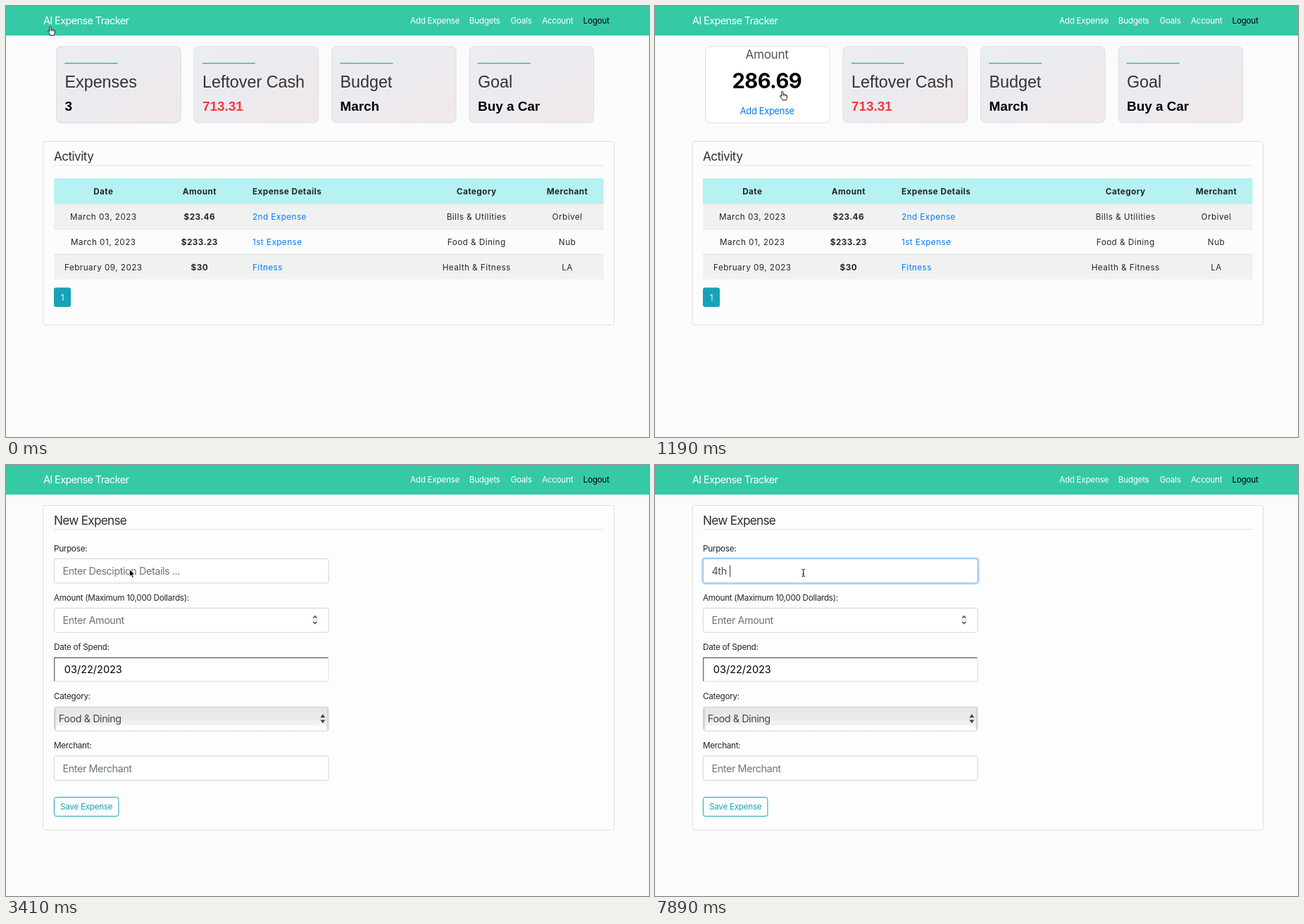
These frames come from a looping animation (913x613 px, 8000 ms). An HTML page:

```html
<!DOCTYPE html>
<html lang="en">
<head>
<meta charset="utf-8">
<title>Expense tracker</title>
<style>
html, body { margin: 0; width: 100%; height: 100%; overflow: hidden; background: #fbfbfb; }
#stage { position: relative; width: 913px; height: 613px; overflow: hidden; }
svg { position: absolute; left: 0; top: 0; overflow: visible; }
text { font-family: Inter, Roboto, sans-serif; white-space: pre; }
text.arial { font-family: "Liberation Sans", Arial, sans-serif; }
#scene { position: absolute; left: 71px; top: 57px; width: 177px; height: 109px; perspective: 960px; }
#flip { position: absolute; inset: 0; transform-style: preserve-3d; }
#flip svg { backface-visibility: hidden; }
#back { transform: rotateY(180deg); }
</style>
</head>
<body>
<div id="stage">
  <svg id="bar" width="913" height="613"></svg>
  <div id="home">
    <svg id="dash" width="913" height="613"></svg>
    <div id="scene"><div id="flip">
      <svg id="front" width="177" height="109" viewBox="71 57 177 109"></svg>
      <svg id="back" width="177" height="109" viewBox="71 57 177 109"></svg>
    </div></div>
  </div>
  <svg id="form" width="913" height="613"></svg>
  <svg id="pointer" width="913" height="613">
    <g id="hand" fill="#fff" stroke="#111" stroke-width="1" stroke-linejoin="round">
      <path d="M-2.3 1.4V-4.4Q-2.3-5.7-1.2-5.7T-.1-4.4V-1.4Q.8-2 1.7-1.1Q2.7-1.6 3.5-.6Q5.4-.9 5.4 1V3Q5.4 4.4 4.4 5.6V6.8H-1.2V5.8L-4.4 1.8Q-4.8 .5-3.6 .5Z"/>
      <path d="M-.1-1.4V1M1.8-1V1.2M3.6-.5V1.4" fill="none" stroke-width=".7"/>
    </g>
    <path id="arrow" d="M0 0V10.4L2.4 8.2L4 12L5.8 11.2L4.2 7.5H7.4Z" fill="#000" stroke="#fff" stroke-width=".8"/>
    <path id="beam" d="M-2.4-5.2Q0-5.2 0-3.8Q0-5.2 2.4-5.2M0-3.8V3.8M-2.4 5.2Q0 5.2 0 3.8Q0 5.2 2.4 5.2M-1.2 1.6H1.2" fill="none" stroke="#111" stroke-width="1"/>
  </svg>
</div>
<script>
const LOOP = 8000;
const $ = id => document.getElementById(id);
const INK = '#212529', LINK = '#007bff', TEAL = '#17a2b8';

const escape = s => s.replace(/&/g, '&amp;');

// ls is the letter spacing in em
function text(x, y, str, { size = 11.7, fill = INK, ls = -.023, weight = 400, anchor = 'start', attr = '' } = {}) {
  return `<text x="${x}" y="${y}" font-size="${size}" fill="${fill}" font-weight="${weight}"
    letter-spacing="${(ls * size).toFixed(3)}" text-anchor="${anchor}" ${attr}>${escape(str)}</text>`;
}
function rect(x, y, w, h, fill, stroke = 'none', r = 0, attr = '') {
  return `<rect x="${x}" y="${y}" width="${w}" height="${h}" rx="${r}" fill="${fill}" stroke="${stroke}" ${attr}/>`;
}
const path = (d, stroke, width = 1, fill = 'none') =>
  `<path d="${d}" stroke="${stroke}" stroke-width="${width}" fill="${fill}"/>`;
const heading = (y, str, ls) => text(68, y, str, { size: 17.2, ls, fill: '#2b2f33' });

function drawBar() {
  const links = [[574, 'Add Expense'], [657.8, 'Budgets'], [716.5, 'Goals'], [761, 'Account']];
  $('bar').innerHTML = rect(0, 0, 913, 42, '#36c9a6')
    + text(53, 25.7, 'AI Expense Tracker', { size: 14.4, ls: -.04, fill: '#fff' })
    + links.map(([x, s]) => text(x, 24.8, s, { fill: '#fff' })).join('')
    + text(819.6, 24.8, 'Logout', { fill: '#000' });
}

function card(x, title, value, color = '#000') {
  const plain = { ls: 0, attr: 'class="arial"' };
  return rect(x + .5, 57.5, 176.5, 108.5, 'url(#tint)', '#dcdee0', 7)
    + path(`M${x + 12.3} 81.6h75`, '#35b799', 1.5)
    + text(x + 12.5, 116, title, { ...plain, size: 23.3, fill: '#333' })
    + text(x + 12.5, 148.6, value, { ...plain, size: 18.9, weight: 700, fill: color });
}

function tableRow(i, [date, amount, details, category, merchant]) {
  const y = 304 + i * 35.8;
  const mid = { anchor: 'middle', ls: .04 };
  return text(138.3, y, date, mid)
    + text(274.8, y, amount, { ...mid, weight: 700 })
    + text(350, y, details, { ls: .04, fill: LINK })
    + text(668.2, y, category, mid)
    + text(797, y, merchant, mid);
}

function drawDash() {
  const rows = [
    ['March 03, 2023', '$23.46', '2nd Expense', 'Bills & Utilities', 'Orbivel'],
    ['March 01, 2023', '$233.23', '1st Expense', 'Food & Dining', 'Nub'],
    ['February 09, 2023', '$30', 'Fitness', 'Health & Fitness', 'LA']
  ];
  const head = { weight: 700, ls: .04, anchor: 'middle' };
  $('dash').innerHTML = `<defs><linearGradient id="tint" x1="0" y1="0" x2="1" y2="1">
      <stop offset="0" stop-color="#eaedf1"/><stop offset=".5" stop-color="#ecebef"/>
      <stop offset="1" stop-color="#f1e8ea"/></linearGradient></defs>`
    + rect(71.5, 57.5, 176.5, 108.5, '#fff', '#dcdee0', 7)
    + card(266.5, 'Leftover Cash', '713.31', '#f6383b')
    + card(462, 'Budget', 'March')
    + card(657.5, 'Goal', 'Buy a Car')
    + rect(53, 192.5, 810.5, 261, '#fcfcfc', '#dfdfdf', 3)
    + heading(220.2, 'Activity', -.034)
    + path('M68 226.8H848.5', '#e2e2e2')
    + rect(68, 245, 780.5, 36.5, '#b5f2f1')
    + rect(68, 281.5, 780.5, 36, '#f0f2f1') + rect(68, 353.2, 780.5, 35.8, '#f0f2f1')
    + path('M68 281.5H848.5M68 317.5H848.5M68 353.2H848.5', '#dee2e4')
    + [[138.3, 'Date'], [274.8, 'Amount'], [668.2, 'Category'], [797, 'Merchant']]
        .map(([x, s]) => text(x, 267.7, s, head)).join('')
    + text(350, 267.7, 'Expense Details', { ...head, anchor: 'start' })
    + rows.map((r, i) => tableRow(i, r)).join('')
    + rect(68, 400.5, 24, 27.5, TEAL, 'none', 3)
    + text(80, 418.6, '1', { fill: '#fff', anchor: 'middle' });
  $('front').innerHTML = card(71, 'Expenses', '3');
  $('back').innerHTML = text(159, 75, 'Amount', { size: 17.2, ls: -.02, anchor: 'middle', fill: '#555' })
    + text(158.8, 117, '286.69', { size: 29.2, ls: -.02, weight: 700, anchor: 'middle', fill: '#000' })
    + text(159.3, 154, 'Add Expense', { size: 12.9, anchor: 'middle', attr: 'id="add"' })
    + `<path id="underline" d="M121 156.3H198" stroke="#0056b3"/>`;
}

function drawForm() {
  const big = { size: 14.4, ls: -.03, fill: '#6c757d' };
  const labels = ['Purpose:', 'Amount (Maximum 10,000 Dollards):', 'Date of Spend:', 'Category:', 'Merchant:'];
  const box = y => rect(68.3, y, 390, 34.5, '#fff', '#ced4da', 3);
  $('form').innerHTML = `<defs><linearGradient id="grey" x1="0" y1="0" x2="0" y2="1">
      <stop offset="0" stop-color="#e5e5e5"/><stop offset=".3" stop-color="#e9e9e9"/><stop offset=".56" stop-color="#ebebeb"/>
      <stop offset=".58" stop-color="#f0f0f0"/><stop offset=".76" stop-color="#f2f2f2"/>
      <stop offset=".78" stop-color="#fdfdfd"/><stop offset="1" stop-color="#fff"/></linearGradient></defs>`
    + rect(53, 57.5, 810.5, 461.5, '#fdfdfd', '#dfdfdf', 3)
    + heading(84.8, 'New Expense', -.042)
    + path('M68 91.6H848.5', '#e2e2e2')
    + labels.map((s, i) => text(68, 122.7 + i * 70.1, s)).join('')
    + box(133.4) + box(203.6) + box(413.9)
    + rect(66.9, 132.1, 392.8, 37.1, 'none', '#bfdeff', 4, 'id="ring" stroke-width="2.2"')
    + rect(68.3, 133.4, 390, 34.5, 'none', '#80bdff', 3, 'id="edge"')
    + text(80.5, 156, 'Enter Desciption Details ...', { ...big, attr: 'id="hint"' })
    + text(80.5, 156, '', { ...big, fill: '#495057', attr: 'id="typed"' })
    + `<path id="caret" d="M0 142.5V159" stroke="#333"/>`
    + text(80.5, 226.2, 'Enter Amount', big)
    + rect(434, 212.5, 10, 16, '#f6f6f6', 'none', 5)
    + path('M434 220.5h10', '#e2e2e2', .8)
    + path('M436.2 217.6l2.6-2.6l2.6 2.6M436.2 222.9l2.6 2.6l2.6-2.6', '#444', 1.4)
    + rect(68.3, 273.8, 389.7, 34, '#fff', '#e0e0e0', 2)
    + path('M68.7 307.5V274.2H457.5', '#757575', 1.4)
    + text(82.8, 296.2, '03/22/2023', { size: 14.5, ls: 0, fill: '#000' })
    + rect(68.5, 344, 389.5, 34.3, 'url(#grey)', '#cfcfcf', 3)
    + path('M70 346V376M456.6 346V376', '#d5d5d5', 2)
    + text(74.8, 366.2, 'Food & Dining', { ...big, fill: '#444a50' })
    + path('M446.3 359.2l3.5-5l3.5 5zM446.3 362.4l3.5 5l3.5-5z', 'none', 0, '#40464c')
    + text(80.5, 436.6, 'Enter Merchant', big)
    + rect(68.4, 472.5, 91.5, 27, '#fff', TEAL, 3)
    + text(114.2, 490.4, 'Save Expense', { fill: TEAL, anchor: 'middle' });
}

// Each track is a list of [start time, ...values], held until the next entry.
const tracks = {
  cursor: [
    [0, 'hand', 64, 35], [150, 'arrow', 48, 58], [300, 'arrow', 27, 81],
    [590, 'arrow', 62, 92], [740, 'hand', 148, 116], [890, 'hand', 182, 127],
    [1790, 'hand', 195, 128], [1940, 'hand', 210, 130], [2080, 'hand', 219, 131],
    [2230, 'hand', 217, 138], [2380, 'hand', 206, 147], [2530, 'hand', 194, 154],
    [2670, 'hand', 183, 156], [2810, 'hand', 177, 154],
    [3260, 'arrow', 175.4, 148.4], [3860, 'beam', 210.7, 153.3]
  ],
  angle: [[0, 0], [740, 5], [890, 82], [1040, 155], [1190, 180]],
  hover: [[0, false], [2530, true]],
  form: [[0, false], [3410, true]],
  focus: [[0, 0], [4160, .6], [4310, 1]],
  caret: [[0, 0], [4160, 1], [4760, 0], [5210, 1], [5810, 0], [6260, 1], [6700, 0], [7000, 1]],
  typed: [[0, '', 80.8], [7000, '4', 89.8], [7450, '4t', 94.5], [7590, '4th', 102.6], [7890, '4th ', 106.6]]
};
const at = (name, t) => tracks[name].findLast(step => step[0] <= t).slice(1);
const show = (id, on) => { $(id).style.display = on ? '' : 'none'; };

function render(t) {
  const [shape, x, y] = at('cursor', t);
  for (const id of ['hand', 'arrow', 'beam']) show(id, id === shape);
  $(shape).setAttribute('transform', `translate(${x} ${y})`);

  const [onForm] = at('form', t);
  show('home', !onForm);
  show('form', onForm);

  $('flip').style.transform = `rotateY(${at('angle', t)[0]}deg)`;
  const [hover] = at('hover', t);
  $('add').setAttribute('fill', hover ? '#0056b3' : LINK);
  show('underline', hover);

  const [focus] = at('focus', t);
  $('ring').style.opacity = $('edge').style.opacity = focus;
  const [typed, caretX] = at('typed', t);
  $('typed').textContent = typed;
  show('hint', !typed);
  show('caret', at('caret', t)[0]);
  $('caret').setAttribute('transform', `translate(${caretX} 0)`);
}

drawBar();
drawDash();
drawForm();
const start = performance.now();
function tick() {
  render((performance.now() - start) % LOOP);
  requestAnimationFrame(tick);
}
tick();
</script>
</body>
</html>
```
